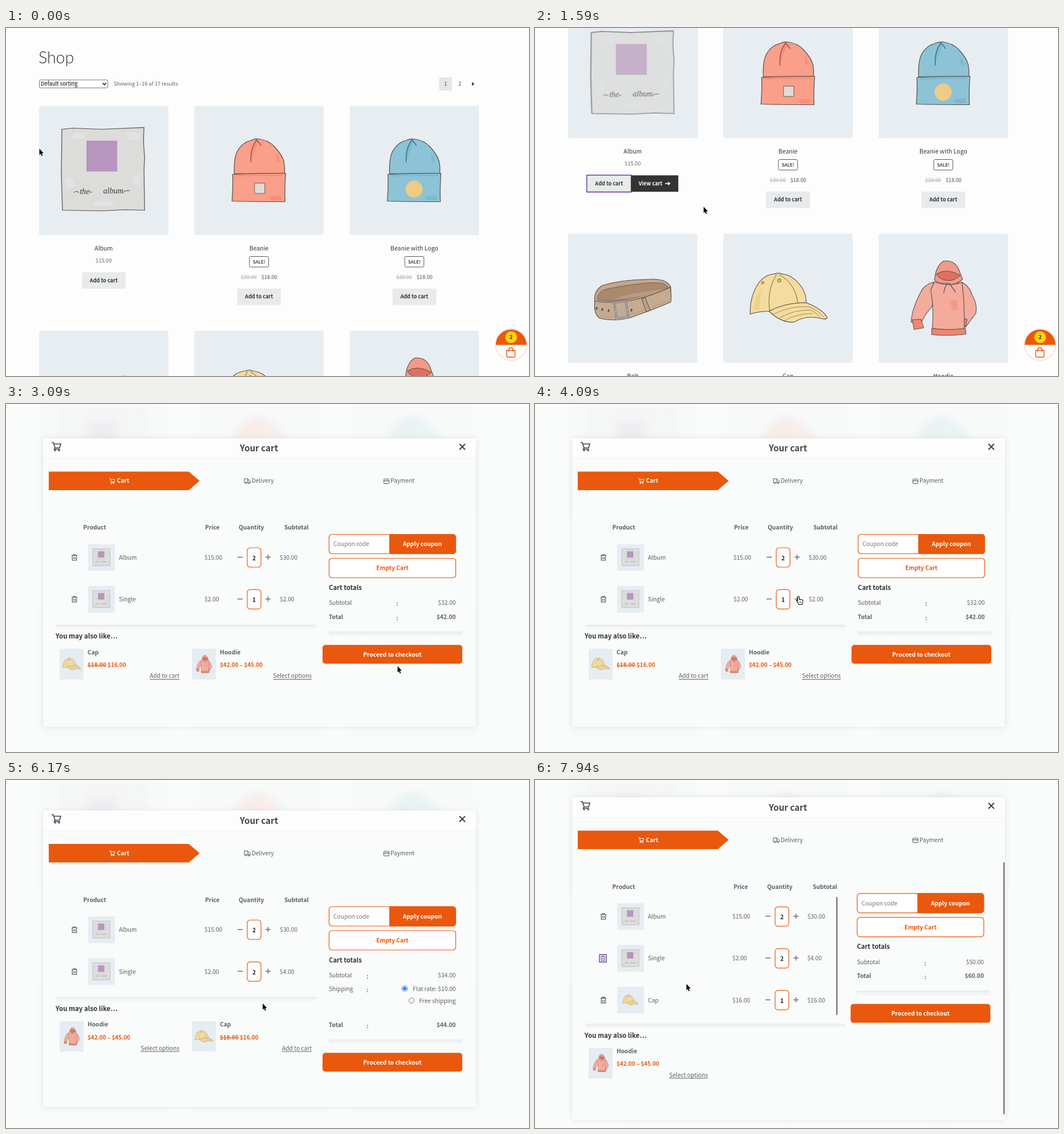
Animation of 917 by 610 pixels, one loop 8000 ms. Source, as an HTML page with a canvas:

```html
<!DOCTYPE html>
<html lang="en">
<head>
<meta charset="utf-8">
<title>Shop and cart</title>
<style>
html, body { margin: 0; width: 100%; height: 100%; overflow: hidden; background: #fdfdfd; }
canvas { display: block; }
</style>
</head>
<body>
<canvas id="stage" width="917" height="610"></canvas>
<script>
const W = 917, H = 610, LOOP = 8000, TILE = 226.6;
const ORANGE = '#e9580c', GREY = '#5b5e62', DARK = '#35363a', PURPLE = '#7f54b3', INK = '#54504c';
const FONT = '"Noto Sans CJK SC", "Noto Sans CJK JP", "Noto Sans CJK", "Noto Sans", sans-serif';
const EM = 1.117; // Latin glyphs of this face are drawn larger than their nominal size
const stage = document.getElementById('stage').getContext('2d');
let g = stage;

// ---------- helpers ----------
function text(str, x, y, size, color = GREY, weight = 400, align = 'left') {
  g.font = `${weight} ${(size / EM).toFixed(2)}px ${FONT}`;
  g.textAlign = align;
  g.fillStyle = color;
  g.fillText(str, x, y + size * 0.33);
  return g.measureText(str).width;
}

function rect(x, y, w, h, fill, r = 0, stroke, line = 1) {
  g.beginPath();
  g.roundRect(x, y, w, h, r);
  if (fill) { g.fillStyle = fill; g.fill(); }
  if (stroke) { g.strokeStyle = stroke; g.lineWidth = line; g.stroke(); }
}

function path(d, fill, stroke, line = 1.1) {
  const p = new Path2D(d);
  if (fill) { g.fillStyle = fill; g.fill(p); }
  if (stroke) { g.strokeStyle = stroke; g.lineWidth = line; g.stroke(p); }
}

function disc(x, y, r, fill, stroke, line = 1) {
  g.beginPath();
  g.arc(x, y, r, 0, 7);
  if (fill) { g.fillStyle = fill; g.fill(); }
  if (stroke) { g.strokeStyle = stroke; g.lineWidth = line; g.stroke(); }
}

function line(x1, y1, x2, y2, color, w = 1) {
  path(`M${x1} ${y1}L${x2} ${y2}`, null, color, w);
}

function at(x, y, draw, scale = 1) {
  g.save();
  g.translate(x, y);
  g.scale(scale, scale);
  draw();
  g.restore();
}

function track(keys, t) {
  const i = keys.findIndex(k => k[0] > t);
  if (i < 0) return keys[keys.length - 1].slice(1);
  if (i === 0) return keys[0].slice(1);
  const a = keys[i - 1], b = keys[i], u = (t - a[0]) / (b[0] - a[0]);
  return a.slice(1).map((v, n) => v + (b[n + 1] - v) * u);
}

const money = n => '$' + n.toFixed(2);

// ---------- product drawings, in tile coordinates ----------
function album() {
  path('M40 41L58 39L110 41L184 38L183 62L185 90L184 112L185 183L150 182L112 184L41 183L39 120Z', '#dcdcda', INK, 1.2);
  path('M60 48h22l-4 9h-20zM150 46l28 2-3 12-20-2zM46 128l14-3 3 16-15 6zM95 168l30-2 8 8-36 2zM165 120l12 2v18l-9-3z', '#e2e4e4');
  rect(83, 61, 54, 54, '#b795bf');
  g.font = 'italic 14px "Liberation Serif", serif';
  g.textAlign = 'center';
  g.fillStyle = '#3d3a3a';
  g.fillText('the', 80, 154);
  g.fillText('album', 130, 153);
  path('M61 152q4-4 9 0M88 152q3-3 5 0M147 152q5-5 12-3', null, '#3d3a3a', 1);
}

function hat(base, shade, deep, patch) {
  path('M70 119Q69 92 75 80Q84 64 98 61Q106 57 113 58Q130 60 141 72Q154 86 157 98Q159 108 158 118Z', base, INK, 1.2);
  path('M110 60Q98 70 99 99Q104 80 113 62ZM143 84q7 6 6 16l-6-4z', shade);
  path('M110 59Q98 72 99 99M108 60Q113 62 117 70', null, deep, 1.4);
  path('M67 120Q110 118 160 118Q158 145 159 168Q110 168 66 167Q68 140 67 120Z', base, INK, 1.2);
  path('M72 121Q110 119 156 120L155 123Q110 122 72 124ZM132 159l20-2 1 8-18 1z', shade);
  patch();
}

const beanie = () => hat('#f99f8a', '#f4907a', '#a2483c', () => {
  rect(105.5, 135.5, 18, 18, '#dedddb', 0, '#7b5a52', 1);
});
const logoBeanie = () => hat('#8dc3d6', '#7fb8cb', '#356b7e', () => {
  disc(113, 146, 15, '#efcb85');
});

function belt() {
  path('M47 121Q44 100 60 91Q90 81 142 80Q174 78 180 94L180 108Q120 128 60 124Z', '#c3a68c', INK, 1.1);
  path('M52 116Q50 102 68 97Q110 88 150 86Q172 85 176 95Q140 108 110 114Q80 121 52 116Z', '#a98a6f', '#6d5848', 0.9);
  path('M80 114Q110 104 140 101Q162 98 174 96Q150 107 110 113Z', '#b99a7d');
  path('M47 118Q80 124 116 116Q150 108 179 94Q182 110 180 120Q145 135 110 147Q80 155 55 148Q44 140 47 118Z', '#c7ab91', INK, 1.1);
  path('M55 144Q90 150 125 137T178 117', null, '#ab9077', 0.8);
  path('M81 121L101 118L106 147L85 150Z', null, '#6e7175', 3.6);
  path('M81 121L101 118L106 147L85 150ZM84 136L104 133', null, '#a7abb0', 2);
  path('M129 114l6-2 9 22-7 3z', '#bda084', INK, 1);
  for (const [x, y] of [[50, 131], [60, 133], [71, 135], [111, 134]]) {
    g.beginPath();
    g.ellipse(x, y, 1.7, 2.8, 0.2, 0, 7);
    g.fillStyle = '#6d5848';
    g.fill();
  }
}

function cap() {
  path('M47 141Q46 110 62 86Q74 70 96 70Q122 70 138 95Q146 108 145 121Q112 121 80 136Q62 136 47 141Z', '#f4dca0', INK, 1.1);
  path('M52 133Q56 108 70 92Q62 116 64 134Z', '#eed18e');
  path('M80 136Q108 121 145 121Q174 132 182 147Q181 151 172 149Q146 142 124 155Q102 157 80 136Z', '#f4dca0', INK, 1.1);
  path('M88 141Q118 126 150 128Q169 136 176 147M98 148Q122 133 153 134Q165 140 169 147M108 152Q128 140 157 140', null, '#94804f', 0.9);
  path('M93 72Q76 98 81 136M98 72Q127 88 130 121', null, '#75623d', 1);
  disc(98, 82, 3.2, '#dcb768', '#75623d', 0.9);
  disc(69, 86, 2.2, '#dcb768', '#75623d', 0.9);
  path('M90 71q6-4 13 0', '#e6c577', INK, 1);
}

function hoodie() {
  const skin = '#f4ab9c', red = '#ef8673';
  path('M96 85Q79 90 74 102Q58 132 57 155L73 162Q76 148 94 127Z', skin, INK, 1.1);
  path('M59 151L74 150L79 165L62 168Z', red, INK, 1);
  path('M145 85Q158 90 164 108Q174 126 170 140L153 163L138 154Q150 138 146 124Z', skin, INK, 1.1);
  path('M138 145L155 150L152 164L136 158Z', red, INK, 1);
  path('M98 84Q120 94 146 85Q151 120 150 167Q122 170 94 166Q97 125 91 99Z', skin, INK, 1.1);
  path('M93 166Q122 170 152 166L153 176Q122 180 93 177Z', red, INK, 1);
  path('M98 81Q100 56 114 48Q133 46 140 62L147 80Q132 93 119 87Q104 88 98 81Z', '#f29a89', INK, 1.1);
  path('M101 71Q119 59 143 73Q132 84 119 82Q108 81 101 71Z', '#e0705f', INK, 1);
  path('M120 87Q115 96 114 104M123 87Q131 96 135 103', null, INK, 1.2);
  path('M125 118l12-2 3 16-10 4z', '#f19a89');
}

// ---------- shop page ----------
const COLS = [58, 330.3, 602.6];
const ROWS = [
  [{ name: 'Album', art: album, price: 15 },
   { name: 'Beanie', art: beanie, price: 18, old: 20 },
   { name: 'Beanie with Logo', art: logoBeanie, price: 18, old: 20 }],
  [{ name: 'Belt', art: belt }, { name: 'Cap', art: cap }, { name: 'Hoodie', art: hoodie }]
];

function button(x, y, w, label, fill, color) {
  rect(x, y, w, 28.7, fill);
  text(label, x + w / 2, y + 14.3, 10.2, color, 600, 'center');
}

function product(p, x, y, s) {
  const mid = x + TILE / 2;
  rect(x, y, TILE, TILE, '#e8edf1', 3);
  at(x, y, p.art);
  text(p.name, mid, y + 249.7, 11.7, DARK, 400, 'center');
  if (!p.price) return;
  if (p.old) {
    rect(mid - 16.8, y + 264, 33.6, 18.5, '#fff', 2.5, '#55575c');
    text('SALE!', mid, y + 273.3, 8.6, '#43454b', 600, 'center');
    const w = text(money(p.old), mid - 32, y + 300, 10.2, '#adadad');
    line(mid - 32, y + 300.5, mid - 32 + w, y + 300.5, '#adadad');
    text(money(p.price), mid + 32, y + 300, 10.2, '#4c4e52', 500, 'right');
    button(mid - 38.3, y + 320.3, 76.6, 'Add to cart', '#e9eaeb', DARK);
    return;
  }
  text(money(p.price), mid, y + 271.5, 10.2, '#626262', 400, 'center');
  const top = y + 291.8;
  if (s.added) {
    button(mid - 80, top, 77, 'Add to cart', '#e9eaeb', DARK);
    rect(mid - 80.5, top - 0.5, 78, 29.7, null, 0, PURPLE, 1.8);
    rect(mid - 3, top, 83, 28.7, '#333');
    text('View cart', mid + 10.5, top + 14.3, 10.2, '#fff', 600);
    path(`M${mid + 57} ${top + 14.3}h8m-3-2.500l3 2.500l-3 2.500`, null, '#fff', 1.6);
  } else {
    button(mid - 38.3, top, 76.6, 'Add to cart', s.hover ? '#d7d8d9' : '#e9eaeb', DARK);
    if (s.focus) rect(mid - 38.8, top - 0.5, 77.6, 29.7, null, 0, PURPLE, 1.8);
  }
}

function heading() {
  g.font = '300 28.5px Lato, "Open Sans", sans-serif';
  g.textAlign = 'left';
  g.fillStyle = '#333';
  g.fillText('Shop', 57, 62);
}

function shop(s) {
  rect(0, 0, W, H, '#fdfdfd');
  g.save();
  g.translate(0, -s.scroll);
  heading();
  rect(58.5, 91, 120, 14, '#fff', 2, '#767676');
  text('Default sorting', 61, 98, 10.5, '#000');
  path('M169.5 96.5l3 3 3-3', null, '#000', 1.5);
  text('Showing 1–16 of 17 results', 189, 98, 10.2, '#626262');
  rect(759.5, 86.5, 22.5, 23, '#e6e6e6');
  text('1', 770.7, 98, 10.2, '#43454b', 400, 'center');
  text('2', 795.7, 98, 10.2, '#43454b', 400, 'center');
  path('M817 94.5l4.5 3.5l-4.5 3.5z', '#43454b');
  ROWS.forEach((row, r) => row.forEach((p, c) => product(p, COLS[c], 136.5 + r * 394, s)));
  g.restore();
}

function bubble() {
  disc(885.7, 555, 27.5, '#fff', '#fbdccb', 1.4);
  g.beginPath();
  g.arc(885.7, 555.5, 27, Math.PI, 0);
  g.fillStyle = ORANGE;
  g.fill();
  disc(885.7, 542, 10.3, '#ffd20a');
  text('2', 885.7, 542, 10, '#222', 700, 'center');
  path('M878 565h14.5v10a2 2 0 0 1-2 2h-10.5a2 2 0 0 1-2-2zM881.5 568v-4.500a3.800 3.800 0 0 1 7.500 0v4.500', null, ORANGE, 1.4);
}

function flight(t) {
  const u = (t - 1500) / 1000;
  if (u <= 0 || u >= 1) return;
  const e = u < 0.5 ? 2 ** (20 * u - 10) / 2 : 1 - 2 ** (10 - 20 * u) / 2;
  const mix = (a, b) => a + (b - a) * e, size = mix(TILE, 36);
  g.globalAlpha = 0.5;
  at(mix(58, 855), mix(-33.5, 524), () => {
    rect(0, 0, TILE, TILE, '#e8edf1');
    album();
  }, size / TILE);
  g.globalAlpha = 1;
}

// ---------- cart window ----------
function thumb(art, x, y, w, h) {
  const k = Math.max(w, h) / TILE;
  g.save();
  g.beginPath();
  g.rect(x, y, w, h);
  g.clip();
  rect(x, y, w, h, '#e6edf2');
  at(x + w / 2 - TILE * k / 2, y + h / 2 - TILE * k / 2, art, k);
  g.restore();
}

function trolley(x, y, k, color) {
  at(x, y, () => {
    path('M0 1h3l3 9.500h8l2-7H4M6 10.500l-1.500 2.500h10.500', null, color, 1.6);
    disc(6, 15, 1.4, color);
    disc(13, 15, 1.4, color);
  }, k);
}

function trash(x, y, color, scale = 1) {
  at(x, y, () => {
    path('M-5-3.500h10M-2-3.500v-1.500h4v1.500M-3.800-3v8h7.600v-8M-1.300-1v4M1.300-1v4', null, color, 1.1);
  }, scale);
}

function edge(x, y, w) {
  const f = g.createLinearGradient(0, y, 0, y + 9);
  f.addColorStop(0, '#e6e9ea');
  f.addColorStop(1, 'rgba(240,243,243,0)');
  rect(x, y, w, 9, f);
}

function steps() {
  path('M75 118.500H320.500L339.500 134.700L320.500 151H75Z', ORANGE);
  trolley(181, 130, 0.62, '#fff');
  text('Cart', 194.5, 134.7, 11.4, '#fff', 600);
  path('M418 131h6v6.500h-6zM424 133h2.500l2 2v2.500h-4.500', null, '#4a5163', 1);
  disc(420.5, 138.5, 1.3, '#fff', '#4a5163');
  disc(426, 138.5, 1.3, '#fff', '#4a5163');
  text('Delivery', 430.7, 134.7, 11.4, GREY, 500);
  rect(662.5, 131.5, 9, 8, null, 1, '#4a5163');
  line(662.5, 134.5, 671.5, 134.5, '#4a5163', 1.2);
  text('Payment', 674, 134.7, 11.4, GREY, 500);
}

function cartRow(item, y, dx, focus) {
  if (focus) rect(113, y - 6.5, 12, 13, null, 0, PURPLE, 1.6);
  trash(focus ? 119 : 120, y, focus === 'hot' ? '#ee3340' : '#4a4d55', focus ? 0.8 : 1);
  thumb(item.art, 144, y - 23.5, 47, 47);
  text(item.name, 198, y, 11.5, GREY, 500);
  text(money(item.price), 348 + dx, y, 11.4);
  line(406 + dx, y - 0.5, 415 + dx, y - 0.5, GREY, 1.3);
  rect(423 + dx, y - 17, 24, 34, '#fff', 5, ORANGE, 1.2);
  text(item.qty, 435 + dx, y + 1, 11.4, '#222', 700, 'center');
  line(455 + dx, y - 0.5, 464 + dx, y - 0.5, GREY, 1.3);
  line(459.5 + dx, y - 5, 459.5 + dx, y + 4, GREY, 1.3);
  text(money(item.price * item.qty), 480 + dx * 1.3, y, 11.4);
}

const LIKE = {
  cap: { name: 'Cap', art: cap, old: '$18.00', price: '$16.00', link: 'Add to cart' },
  hoodie: { name: 'Hoodie', art: hoodie, price: '$42.00 – $45.00', link: 'Select options' }
};

function suggestion(p, x, y, right) {
  thumb(p.art, x, y + 22, 42, 54);
  text(p.name, x + 49, y + 28, 11.4, GREY, 600);
  let px = x + 49;
  if (p.old) {
    const w = text(p.old, px, y + 50.5, 11.1, ORANGE, 600);
    line(px, y + 51, px + w, y + 51, ORANGE);
    px += w + 2.5;
  }
  text(p.price, px, y + 50.5, 11.1, ORANGE, 600);
  const w = text(p.link, right, y + 69.5, 11.4, GREY, 400, 'right');
  line(right - w, y + 75.5, right, y + 75.5, GREY);
}

function totals(c) {
  const colon = y => text(':', c.colon, y + 2, 11.4, GREY, 600, 'center');
  rect(566.5, 228.5, 222, 34, '#fff', 5, ORANGE, 1.2);
  rect(672, 228, 116.5, 35, ORANGE, [0, 5, 5, 0]);
  text('Coupon code', 574, 245.5, 11.4, '#75777a');
  text('Apply coupon', 730, 245.5, 11.4, '#fff', 600, 'center');
  rect(566.5, 270.5, 222, 34, '#fff', 5, ORANGE, 1.2);
  text('Empty Cart', 677.5, 287.5, 11.4, ORANGE, 600, 'center');
  text('Cart totals', 566, 322, 12.6, '#333', 600);
  text('Subtotal', 566, 348.5, 11.4);
  colon(348.5);
  text(money(c.sub), 788.5, 348.5, 11.4, GREY, 400, 'right');
  if (c.shipping) {
    text('Shipping', 566, 373, 11.4);
    colon(373);
    text('Flat rate: $10.00', 788.5, 373, 11.4, GREY, 400, 'right');
    text('Free shipping', 788.5, 394, 11.4, GREY, 400, 'right');
    disc(699, 372, 4.5, '#fff', '#1a73e8', 1.2);
    disc(699, 372, 2.7, '#1a73e8');
    disc(711, 393, 4.5, '#fff', '#767676');
  }
  const y = c.shipping ? 435.5 : 373;
  text('Total', 566, y, 11.4, GREY, 600);
  colon(y);
  text(money(c.sub + 10), 788.5, y, 11.4, GREY, 600, 'right');
  edge(566, y + 26, 234);
  rect(555, y + 49.3, 245, 33, ORANGE, 5);
  text('Proceed to checkout', 677.5, y + 65.8, 11.4, '#fff', 600, 'center');
}

function cartState(t) {
  const items = [
    { name: 'Album', art: album, price: 15, qty: 2 },
    { name: 'Single', art: album, price: 2, qty: t < 4290 ? 1 : 2 }
  ];
  if (t < 4490) return { items, top: 60, bottom: 566, sub: 32, colon: 686, dx: 0, likes: [LIKE.cap, LIKE.hoodie] };
  if (t < 6760) return { items, top: 53.5, bottom: 573, sub: 34, colon: 634, dx: 0, shipping: true, likes: [LIKE.hoodie, LIKE.cap] };
  items.push({ name: 'Cap', art: cap, price: 16, qty: 1 });
  return { items, top: 30.3, bottom: 596, sub: 50, colon: 686, dx: -2, bars: true, likes: [LIKE.hoodie],
           focus: t < 7190 ? null : t < 7590 ? 'hot' : 'kept' };
}

function cart(c) {
  g.save();
  g.shadowColor = 'rgba(70,80,90,.13)';
  g.shadowBlur = 9;
  rect(65, c.top, 759, c.bottom - c.top, '#fafbfb');
  g.restore();
  rect(65, c.top, 759, 35, '#fdfdfd');
  line(65, c.top + 35.5, 824, c.top + 35.5, '#f0f2f3');

  g.save();
  g.translate(0, c.top - 60);
  trolley(80, 66.5, 1, '#3f4350');
  text('Your cart', 443.5, 77.7, 17, '#4a4542', 600, 'center');
  path('M795 70l10 10m0-10l-10 10', null, '#3c3f46', 2);
  steps();
  text('Product', 135.5, 216.7, 11.4, GREY, 600);
  text('Price', 349 + c.dx / 2, 216.7, 11.4, GREY, 600);
  text('Quantity', 408 + c.dx / 2, 216.7, 11.4, GREY, 600);
  text('Subtotal', 488 + c.dx / 2, 216.7, 11.4, GREY, 600);
  c.items.forEach((item, i) => cartRow(item, 269 + i * 73.3, c.dx, i === 1 && c.focus));
  const y = c.bars ? 477 : 407;
  edge(88, y - 20, 456);
  text('You may also like…', 87, y, 12.8, '#333', 600);
  c.likes.forEach((p, i) => suggestion(p, 94 + i * 232, y, 304 + i * 232 + c.dx / 2));
  at(c.dx * 0.8, 0, () => totals(c));
  g.restore();

  if (c.bars) {
    rect(528, 205, 2.5, 207, '#7b7b7b', 1);
    rect(821, 144, 2.5, 442, '#7b7b7b', 1);
  }
}

// ---------- pointer ----------
const POINTER = [
  [0, 58, 211], [100, 58, 211], [200, 56, 222], [590, 93, 266], [890, 162, 270], [990, 182, 270], [1490, 182, 270],
  [1990, 748, 484], [2390, 861, 568], [2590, 861, 568], [2990, 700, 470], [3090, 686, 459], [3390, 680, 452],
  [3990, 462, 337], [4690, 461, 337], [5090, 508, 468], [5690, 508, 468], [6190, 435, 372], [6270, 435, 372],
  [6470, 341, 358], [6900, 122, 313], [6990, 119, 311], [7540, 119, 311], [7890, 265, 357]
];
const HAND = [[790, 1590], [2290, 2690], [3890, 4790], [4990, 5790]];

function pointer(t) {
  const [x, y] = track(POINTER, t);
  at(x, y, () => {
    g.lineJoin = 'round';
    if (HAND.some(([a, b]) => t >= a && t < b)) {
      path('M-1 1.500q0-1.500 1.300-1.500t1.400 1.500v4.200q1-.8 2.200.2 1.200-.7 2 .4 1.600-.5 1.800 1v3q0 1.700-1.200 3v1.200h-6v-1.200l-3.800-5.100q-.5-1.600 1.200-1.200l1.100 1.100z', '#fff', '#111', 1.1);
      path('M2.500 9v2.500M4.500 9v2.500', null, '#111', 0.8);
    } else {
      const arrow = 'M.5 .5v11l2.400-2.300 1.700 4 1.700-.8-1.700-3.800h3.400z';
      path(arrow, '#000', '#fff', 1.3);
      path(arrow, '#000');
    }
  });
}

// ---------- soft view of the shop behind the cart ----------
function layer(draw) {
  const c = document.createElement('canvas');
  c.width = W;
  c.height = H;
  const keep = g;
  g = c.getContext('2d');
  draw();
  g = keep;
  return c;
}
const sharp = layer(() => shop({ scroll: 170, added: true }));
const veil = layer(() => {
  rect(0, 0, W, H, '#fafcfb');
  g.globalAlpha = 0.14;
  g.filter = 'blur(8px)';
  g.drawImage(sharp, 0, 0);
});

function render(now) {
  const time = now % LOOP;
  const t = Math.max(0, Math.floor((time + 10) / 100) * 100 - 10);
  const open = Math.min(1, Math.max(0, (t - 2490) / 400));
  g.globalAlpha = 1;
  if (open < 1) {
    const [scroll] = track([[0, 0], [90, 0], [590, 103], [890, 170]], t);
    shop({ scroll, hover: t >= 790, focus: t >= 1190, added: t >= 1590 });
    flight(t);
    bubble();
  }
  if (open > 0) {
    g.globalAlpha = open;
    g.drawImage(veil, 0, 0);
    cart(cartState(t));
    g.globalAlpha = 1;
  }
  pointer(t);
  requestAnimationFrame(tick);
}

let start;
function tick(now) {
  start ??= now;
  render(now - start);
}
render(0);
</script>
</body>
</html>
```
